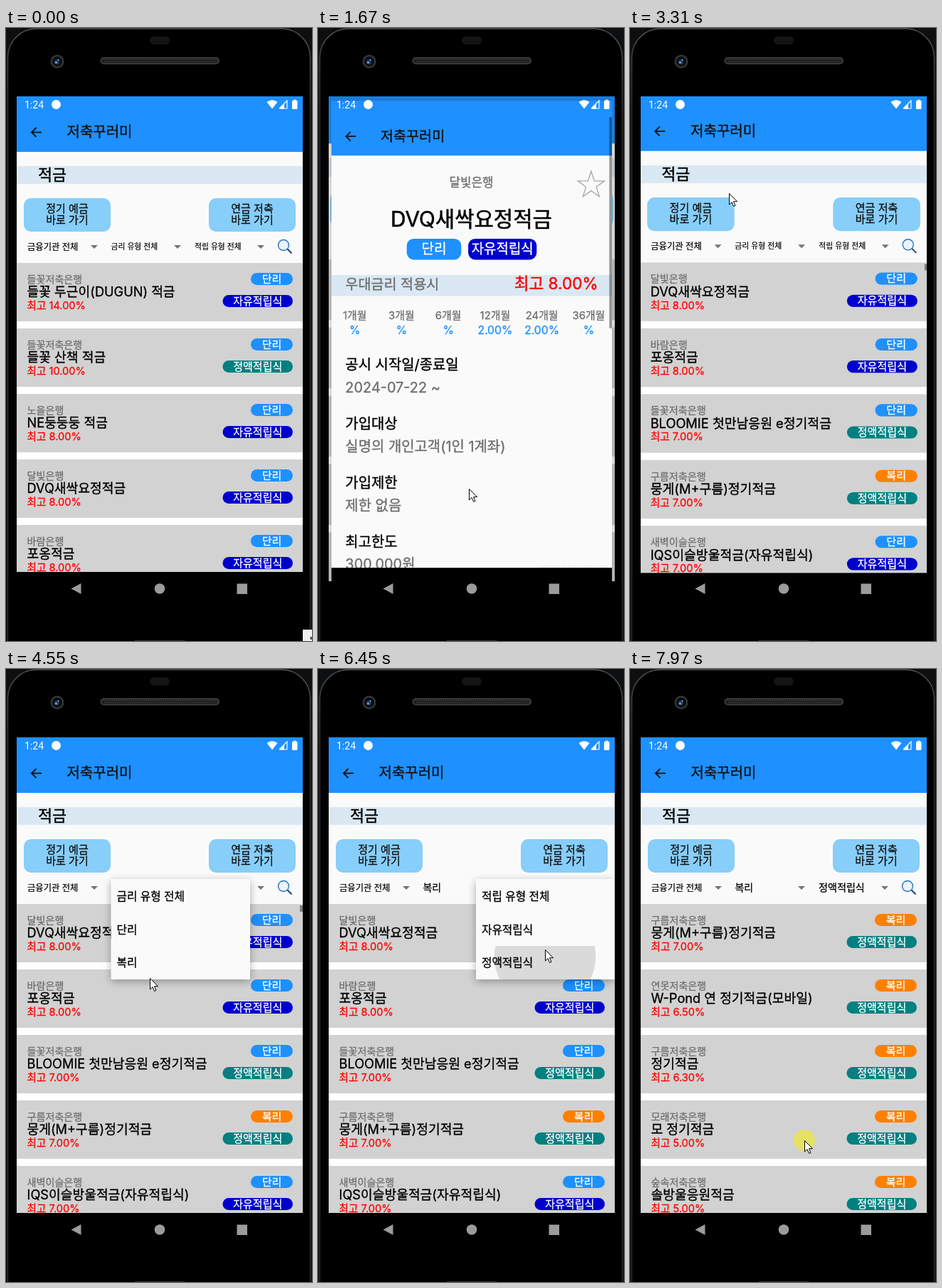
An HTML page with a canvas for the animation above (8 s loop, 430 px wide and 861 px high).

```html
<!DOCTYPE html>
<html lang="ko">
<head>
<meta charset="utf-8">
<title>적금</title>
<style>
html, body { margin: 0; width: 100%; height: 100%; overflow: hidden; background: #000; }
canvas { display: block; width: 430px; height: 861px; }
</style>
</head>
<body>
<canvas id="stage"></canvas>
<script>
const W = 430, H = 861, LOOP = 8000;
const canvas = document.getElementById('stage');
const ctx = canvas.getContext('2d');
const dpr = window.devicePixelRatio || 1;
canvas.width = W * dpr;
canvas.height = H * dpr;

const FONT = 'Inter, "Noto Sans CJK KR", "Noto Sans CJK", sans-serif';
const SCREEN = { x: 15, y: 96, w: 402, h: 715 };
const BLUE = '#1e90ff', NAVY = '#0000cd', TEAL = '#008080', ORANGE = '#ff8000';
const GRAY = '#6e6e6e', STRIP = '#d9e8f2', RED = '#ff0000', PAPER = '#fafafa';

// ---- data ----
const item = (bank, name, rate, kind, plan) => ({ bank, name, rate, kind, plan });
const FREE = '자유적립식', FIXED = '정액적립식', SIMPLE = '단리', COMPOUND = '복리';
const KIND = { [SIMPLE]: BLUE, [COMPOUND]: ORANGE, [FREE]: NAVY, [FIXED]: TEAL };

const all = [
  item('들꽃저축은행', '들꽃 두근이(DUGUN) 적금', '14.00', SIMPLE, FREE),
  item('들꽃저축은행', '들꽃 산책 적금', '10.00', SIMPLE, FIXED),
  item('노을은행', 'NE둥둥둥 적금', '8.00', SIMPLE, FREE),
  item('달빛은행', 'DVQ새싹요정적금', '8.00', SIMPLE, FREE),
  item('바람은행', '포옹적금', '8.00', SIMPLE, FREE),
  item('들꽃저축은행', 'BLOOMIE 첫만남응원 e정기적금', '7.00', SIMPLE, FIXED),
  item('구름저축은행', '뭉게(M+구름)정기적금', '7.00', COMPOUND, FIXED),
  item('새벽이슬은행', 'IQS이슬방울적금(자유적립식)', '7.00', SIMPLE, FREE)
];
const found = [
  all[6],
  item('연못저축은행', 'W-Pond 연 정기적금(모바일)', '6.50', COMPOUND, FIXED),
  item('구름저축은행', '정기적금', '6.30', COMPOUND, FIXED),
  item('모래저축은행', '모 정기적금', '5.00', COMPOUND, FIXED),
  item('숲속저축은행', '솔방울응원적금', '5.00', COMPOUND, FIXED)
];

// ---- timing ----
const OPEN = 1535, CLOSE = 3105, SLIDE = 400, RESULT = 7250;
const clicks = [1010, 2830, 3840, 4900, 5470, 6300, 7070, 7955];
const CLICK_LEN = 125;
// time, x, y
const path = [
  [0, 432, 863], [60, 432, 863], [790, 212, 647], [2140, 212, 647],
  [2420, 68, 140], [2600, 46, 140], [3100, 46, 140], [3310, 139, 232],
  [3720, 190, 303], [3990, 190, 303], [4350, 203, 446], [4550, 202, 434],
  [4800, 196, 414], [5060, 196, 414], [5400, 300, 303], [5690, 300, 303],
  [6100, 319, 394], [6560, 319, 394], [6940, 388, 303], [7290, 388, 303],
  [7830, 245, 662], [LOOP, 245, 662]
];
const popups = [
  { x: 147.5, w: 195.5, from: 3960, to: 5020, tap: 4900, tx: 196, rows: ['금리 유형 전체', SIMPLE, COMPOUND] },
  { x: 222, w: 195, from: 5590, to: 6530, tap: 6300, tx: 319, rows: ['적립 유형 전체', FREE, FIXED] }
];

const clamp = v => Math.max(0, Math.min(1, v));
const mix = (a, b, k) => a + (b - a) * k;
const smooth = k => k * k * (3 - 2 * k);

function cubic(a, b, c, d, u) {
  const v = 1 - u;
  return v * v * v * a + 3 * v * v * u * b + 3 * v * u * u * c + u * u * u * d;
}

// fast out, extra slow in: two joined curves
function slowIn(x) {
  if (x <= 0) return 0;
  if (x >= 1) return 1;
  const [xs, ys] = x < 0.166
    ? [[0, 0.05, 0.133, 0.166], [0, 0, 0.06, 0.4]]
    : [[0.166, 0.208, 0.25, 1], [0.4, 0.82, 1, 1]];
  let lo = 0, hi = 1;
  for (let i = 0; i < 24; i++) {
    const mid = (lo + hi) / 2;
    if (cubic(...xs, mid) < x) lo = mid; else hi = mid;
  }
  return cubic(...ys, lo);
}

function pointer(t) {
  let i = 0;
  while (i < path.length - 2 && path[i + 1][0] <= t) i++;
  const [t0, x0, y0] = path[i], [t1, x1, y1] = path[i + 1];
  const k = smooth(clamp((t - t0) / (t1 - t0)));
  return [mix(x0, x1, k), mix(y0, y1, k)];
}

// ---- drawing helpers ----
function rect(x, y, w, h, color) {
  ctx.fillStyle = color;
  ctx.fillRect(x, y, w, h);
}

function pill(x, y, w, h, r, color) {
  ctx.fillStyle = color;
  ctx.beginPath();
  ctx.roundRect(x, y, w, h, r);
  ctx.fill();
}

function disc(x, y, r, color) {
  ctx.fillStyle = color;
  ctx.beginPath();
  ctx.arc(x, y, r, 0, 7);
  ctx.fill();
}

function poly(points, color) {
  ctx.fillStyle = color;
  ctx.beginPath();
  points.forEach(([x, y]) => ctx.lineTo(x, y));
  ctx.closePath();
  ctx.fill();
}

function line(points, color, width) {
  ctx.strokeStyle = color;
  ctx.lineWidth = width;
  ctx.beginPath();
  points.forEach(([x, y]) => ctx.lineTo(x, y));
  ctx.stroke();
}

// y is the middle of the glyphs; a hairline stroke gives a medium weight
function text(str, x, y, size, color = '#000', align = 'left') {
  ctx.font = `${size}px ${FONT}`;
  ctx.textAlign = align;
  ctx.fillStyle = ctx.strokeStyle = color;
  ctx.lineWidth = size * 0.018;
  ctx.lineJoin = 'round';
  ctx.fillText(str, x, y + size * 0.37);
  ctx.strokeText(str, x, y + size * 0.37);
  ctx.lineJoin = 'miter';
}

function badge(label, x, y, w, h, r, size) {
  pill(x, y, w, h, r, KIND[label]);
  text(label, x + w / 2, y + h / 2 - 0.5, size, '#fff', 'center');
}

// ---- phone ----
function phone() {
  rect(0, 0, W, H, '#0e0f10');
  const edge = ctx.createLinearGradient(0, 0, 0, 120);
  edge.addColorStop(0, '#505355');
  edge.addColorStop(1, '#2b2d2f');
  ctx.beginPath();
  ctx.roundRect(2.5, 1, 425, 930, 40);
  ctx.fillStyle = '#000';
  ctx.fill();
  ctx.lineWidth = 1.5;
  ctx.strokeStyle = edge;
  ctx.stroke();

  pill(202, 12, 28, 11, 5.5, '#151515');
  pill(132.5, 41, 167.5, 10, 5, '#424242');
  pill(134, 42.5, 164.5, 7, 3.5, '#1e1e1e');
  for (let x = 137; x < 297; x += 3) {
    rect(x, 43.5, 1.2, 1.5, '#484848');
    rect(x + 1.5, 46.5, 1.2, 1.5, '#484848');
  }
  disc(72, 47, 9.5, '#343537');
  disc(72, 47, 7, '#0a0d13');
  disc(71.5, 47.5, 3.6, '#1d3350');
  disc(70.5, 48.5, 1.8, '#5f93d8');
  disc(73.5, 45, 0.9, '#a9c4e8');
  rect(181, 860, 70, 1, '#333');
}

function navButtons() {
  const c = '#9b9b9b';
  poly([[91.5, 787.5], [105.5, 780], [105.5, 795]], c);
  disc(216, 787.5, 7.3, c);
  rect(324.5, 780.5, 14.5, 14.5, c);
}

function statusBar() {
  ctx.font = '14px Roboto, sans-serif';
  ctx.textAlign = 'left';
  ctx.fillStyle = '#fff';
  ctx.fillText('1:24', 26, 113);
  disc(70.5, 107.5, 6.5, '#fff');
  ctx.beginPath();
  ctx.moveTo(374, 113.5);
  ctx.lineTo(366.5, 104);
  ctx.quadraticCurveTo(374, 98.5, 381.5, 104);
  ctx.fill();
  line([[384, 113], [395, 113], [395, 102], [384, 113]], '#fff', 1.2);
  poly([[384, 113.5], [391, 113.5], [391, 106]], '#fff');
  pill(402, 102, 7.5, 12, 1, '#fff');
  rect(404, 100.7, 3.5, 2, '#fff');
}

// ---- pages ----
function header() {
  rect(15, 96, 402, 78, BLUE);
  line([[50, 146.5], [36, 146.5]], '#111', 1.8);
  line([[42.5, 140], [36, 146.5], [42.5, 153]], '#111', 1.8);
  text('저축꾸러미', 85.5, 146, 20, '#111');
}

function scrollThumb(y, h, fade = 1) {
  rect(413, y, 4, h, `rgba(0,0,0,${0.4 * fade})`);
}

function shortcut(x, label) {
  pill(x, 239, 122, 47, 10, '#87cefa');
  text(label, x + 61, 253.5, 15, '#111', 'center');
  text('바로 가기', x + 61, 269.5, 15, '#111', 'center');
}

function filter(x, label, size) {
  text(label, x, 307, size, '#000');
}

function card(it, y) {
  rect(15, y, 402, 82, '#d2d2d2');
  text(it.bank, 29.5, y + 22.5, 14.1, GRAY);
  text(it.name, 29.5, y + 40.5, 18.2);
  text(`최고 ${it.rate}%`, 29.5, y + 59.5, 14.6, RED);
  badge(it.kind, 344, y + 14, 59, 17, 8.5, 15);
  badge(it.plan, 304.5, y + 45, 98.5, 17, 8.5, 15);
}

function listPage(t) {
  const back = t >= CLOSE;
  rect(15, 96, 402, 668, PAPER);
  header();
  rect(15, 194, 402, 25, STRIP);
  text('적금', 45, 206, 21.8);
  shortcut(25, '정기 예금');
  shortcut(285, '연금 저축');

  filter(30, '금융기관 전체', 12.3);
  if (t < popups[0].to) filter(147.5, '금리 유형 전체', 10.8);
  else filter(147.5, COMPOUND, 13.9);
  if (t < popups[1].to) filter(265, '적립 유형 전체', 10.8);
  else filter(265, FIXED, 14.1);
  for (const x of [124, 241, 358]) poly([[x - 5, 305], [x + 5, 305], [x, 310]], '#747474');

  disc(390, 305, 7.5, '#eaf4fd');
  ctx.strokeStyle = '#2a72c4';
  ctx.lineWidth = 1.4;
  ctx.beginPath();
  ctx.arc(390, 305, 7.5, 0, 7);
  ctx.stroke();
  line([[395.5, 310.5], [401.5, 316.5]], '#1d3f74', 2);

  rect(15, 330, 402, 434, '#fff');
  const items = t >= RESULT ? found : all.slice(back ? 3 : 0, back ? 8 : 5);
  items.forEach((it, i) => card(it, 330 + i * 92));
  if (t >= 1010 && t < 4900) scrollThumb(back ? 332 : 330, 9, 1 - clamp((t - 4650) / 250));
  rect(15, 764, 402, 47, '#000');
}

function star(cx, cy, r) {
  ctx.beginPath();
  for (let i = 0; i < 10; i++) {
    const a = -Math.PI / 2 + i * Math.PI / 5, q = i % 2 ? r * 0.39 : r;
    ctx.lineTo(cx + q * Math.cos(a), cy + q * Math.sin(a));
  }
  ctx.closePath();
  ctx.strokeStyle = '#a9a9a9';
  ctx.lineWidth = 1.4;
  ctx.stroke();
}

function detailPage() {
  const it = all[3];
  rect(15, 96, 402, 668, PAPER);
  header();
  text(it.bank, 215.5, 212.5, 17.2, GRAY, 'center');
  star(387, 216.5, 20);
  text(it.name, 215.5, 264, 30.3, '#000', 'center');
  badge(SIMPLE, 123, 293, 78, 30, 10, 19.5);
  badge(FREE, 211, 293, 98, 30, 10, 19.3);
  rect(15, 345, 402, 30, STRIP);
  text('우대금리 적용시', 35, 357.5, 20, GRAY);
  text('최고 8.00%', 397, 357, 23, RED, 'right');

  [1, 3, 6, 12, 24, 36].forEach((m, i) => {
    const x = 48.5 + i * 67;
    text(m + '개월', x, 402.5, 15.2, GRAY, 'center');
    text(m === 12 || m === 24 ? '2.00%' : '%', x, 424, 16, BLUE, 'center');
  });
  [
    ['공시 시작일/종료일', '2024-07-22 ~'],
    ['가입대상', '실명의 개인고객(1인 1계좌)'],
    ['가입제한', '제한 없음'],
    ['최고한도', '300,000원']
  ].forEach(([title, value], i) => {
    text(title, 35, 472.5 + i * 84.6, 20.3);
    text(value, 35, 505.5 + i * 84.4, 20.3, GRAY);
  });
  scrollThumb(119, 302);
  rect(15, 764, 402, 47, '#000');
}

// Draws a page scaled about the middle of the screen.
function windowed(draw, scale, alpha = 1) {
  if (alpha <= 0) return;
  const cx = SCREEN.x + SCREEN.w / 2, cy = SCREEN.y + SCREEN.h / 2;
  ctx.save();
  ctx.globalAlpha = alpha;
  ctx.translate(cx, cy);
  ctx.scale(scale, scale);
  ctx.translate(-cx, -cy);
  ctx.beginPath();
  ctx.rect(SCREEN.x, SCREEN.y, SCREEN.w, SCREEN.h);
  ctx.clip();
  draw();
  ctx.restore();
}

function pages(t) {
  const list = () => listPage(t);
  const since = t - (t < CLOSE ? OPEN : CLOSE);
  const k = slowIn(since / SLIDE), fade = clamp((since - 35) / 50);
  if (t < CLOSE) {
    if (k < 1) windowed(list, mix(1, 1.048, k));
    if (k > 0 && k < 1) rect(15, 96, 402, 715, `rgba(0,0,0,${0.16 * k})`);
    windowed(detailPage, mix(0.85, 1, k), fade);
  } else {
    windowed(list, mix(1.1, 1, k));
    windowed(detailPage, mix(1, 0.9, k), 1 - fade);
  }
}

function popup(p, t) {
  const alpha = Math.min(clamp((t - p.from) / 150), 1 - clamp((t - p.to) / 130));
  if (alpha <= 0) return;
  const y = 295, h = 141, row = h / 3;
  ctx.save();
  ctx.globalAlpha = alpha;
  ctx.shadowColor = 'rgba(0,0,0,.32)';
  ctx.shadowBlur = 12 * dpr;
  ctx.shadowOffsetY = 3 * dpr;
  pill(p.x, y, p.w, h, 1.5, PAPER);
  ctx.shadowColor = 'transparent';
  if (t >= p.tap) {
    ctx.save();
    ctx.beginPath();
    ctx.rect(p.x, y + 2 * row, p.w, row);
    ctx.clip();
    disc(p.tx, 404, mix(10, 160, clamp((t - p.tap) / 370)), '#dadada');
    ctx.restore();
  }
  p.rows.forEach((label, i) => text(label, p.x + 8, 319 + i * 46.8, 15.7));
  ctx.restore();
}

function cursor(t) {
  const [x, y] = pointer(t);
  if (clicks.some(c => t >= c && t < c + CLICK_LEN)) disc(x, y, 15, 'rgba(233,228,84,.85)');
  ctx.save();
  ctx.translate(x, y);
  ctx.beginPath();
  [[0.5, 0.5], [0.5, 16], [4, 12.6], [6.6, 18.4], [9, 17.4], [6.5, 11.7], [11.5, 11.7]]
    .forEach(([px, py]) => ctx.lineTo(px, py));
  ctx.closePath();
  ctx.fillStyle = '#fff';
  ctx.fill();
  ctx.strokeStyle = '#000';
  ctx.lineWidth = 1;
  ctx.stroke();
  ctx.restore();
}

function render(t) {
  ctx.setTransform(dpr, 0, 0, dpr, 0, 0);
  phone();
  ctx.save();
  ctx.beginPath();
  ctx.rect(SCREEN.x, SCREEN.y, SCREEN.w, SCREEN.h);
  ctx.clip();
  pages(t);
  popups.forEach(p => popup(p, t));
  statusBar();
  navButtons();
  ctx.restore();
  if (t < 70) {
    rect(417, 845, 13, 16, '#efefef');
    rect(427.5, 855, 2.5, 4, '#555');
  }
  cursor(t);
}

const start = performance.now();
function tick() {
  render((performance.now() - start) % LOOP);
  requestAnimationFrame(tick);
}
tick();
</script>
</body>
</html>
```
